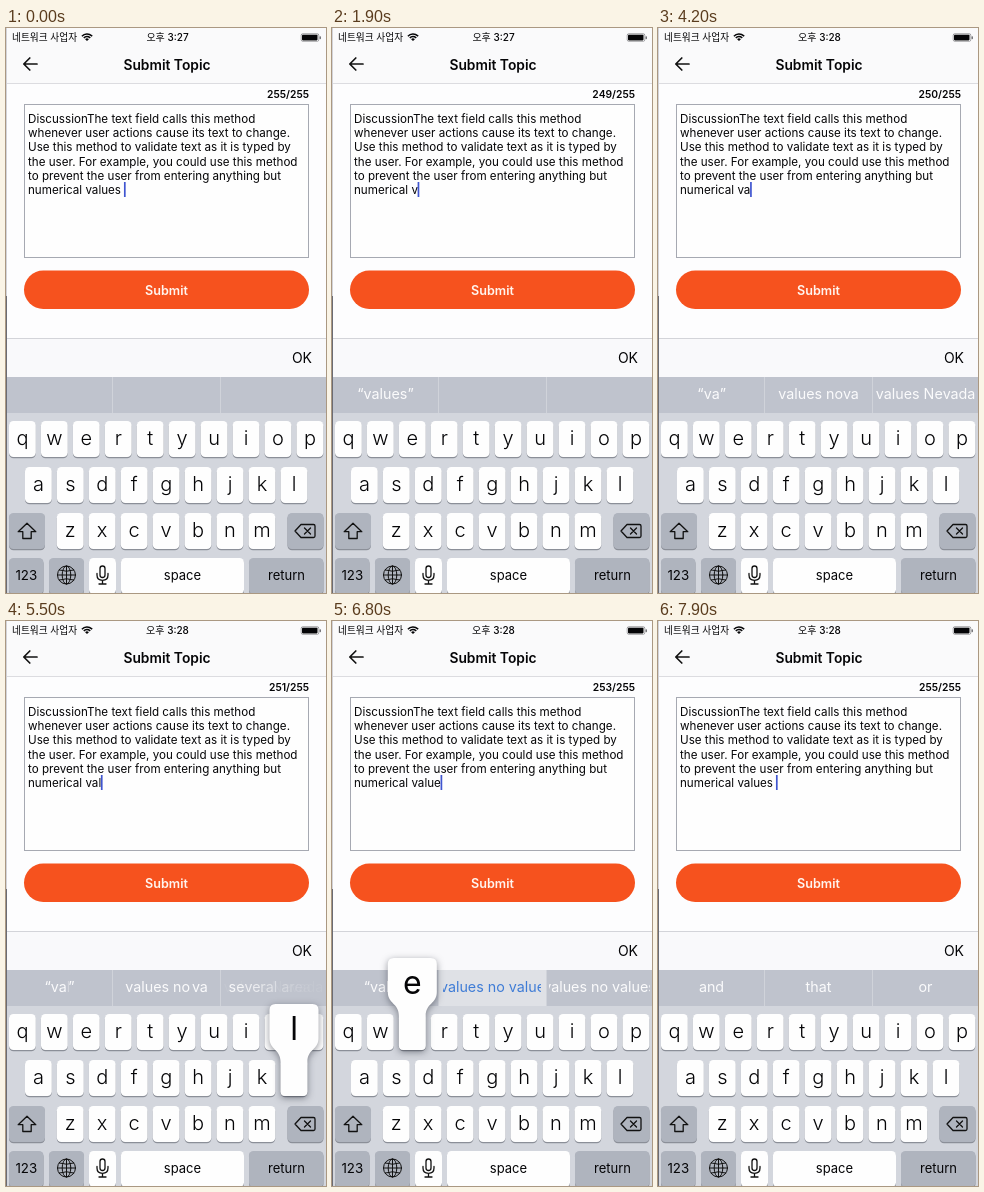
These frames come from a looping animation (320 px wide and 565 px high, 8000 ms). An HTML page with a canvas:

```html
<!DOCTYPE html>
<html lang="ko">
<head>
<meta charset="utf-8">
<title>Submit Topic</title>
<style>
html, body { margin: 0; width: 100%; height: 100%; overflow: hidden; background: #fdfdfe; }
canvas { display: block; width: 320px; height: 565px; }
</style>
</head>
<body>
<canvas id="stage"></canvas>
<script>
const W = 320, H = 565, LOOP = 8000, FADE = 240;
const FONT = 'Inter, "Noto Sans CJK KR", "Noto Sans CJK", "Open Sans", sans-serif';
const canvas = document.getElementById('stage');
const ratio = window.devicePixelRatio || 1;
canvas.width = W * ratio;
canvas.height = H * ratio;
const c = canvas.getContext('2d');
c.scale(ratio, ratio);

const LINES = [
  'DiscussionThe text field calls this method',
  'whenever user actions cause its text to change.',
  'Use this method to validate text as it is typed by',
  'the user. For example, you could use this method',
  'to prevent the user from entering anything but'
];
const LAST = 'numerical values ';
const MAX = 255;

// at: time of the edit, n: characters in the field, key: pressed key, hints: suggestions
const blank = ['', '', ''];
const back = ['“values”', '', ''];
const steps = [
  { at: 0, n: 255, hints: blank },
  { at: 1000, n: 254, key: 'del', hints: back },
  { at: 1200, n: 253, key: 'del', hints: back },
  { at: 1350, n: 252, key: 'del', hints: back },
  { at: 1500, n: 251, key: 'del', hints: back },
  { at: 1650, n: 250, key: 'del', hints: back },
  { at: 1800, n: 249, key: 'del', hints: back },
  { at: 2050, n: 248, key: 'del', hints: blank },
  { at: 2910, n: 249, key: 'v', hints: ['“v”', 'values never', 'values and'] },
  { at: 3850, n: 250, key: 'a', hints: ['“va”', 'values nova', 'values Nevada'] },
  { at: 5390, n: 251, key: 'l', hints: ['“val”', 'values no va', 'several areas'] },
  { at: 6150, n: 252, key: 'u', hints: ['“valu”', 'values no value', 'values no values'] },
  { at: 6700, n: 253, key: 'e', hints: ['“value”', 'values no value', 'values no values'], pick: true },
  { at: 7200, n: 254, key: 's', hints: ['“values”', 'values no', 'values are'] },
  { at: 7580, n: 255, key: 'space', hints: ['and', 'that', 'or'] }
];

const clamp = v => Math.max(0, Math.min(1, v));

function setFont(size, weight = 400) {
  c.font = `${weight} ${size}px ${FONT}`;
}

function text(str, x, y, size, { weight = 400, color = '#050507', align = 'left' } = {}) {
  setFont(size, weight);
  c.fillStyle = color;
  c.textAlign = align;
  c.textBaseline = 'alphabetic';
  c.fillText(str, x, y);
}

function rect(x, y, w, h, color) {
  c.fillStyle = color;
  c.fillRect(x, y, w, h);
}

function round(x, y, w, h, r, color) {
  c.beginPath();
  c.roundRect(x, y, w, h, r);
  c.fillStyle = color;
  c.fill();
}

function stroke(d, width, color = '#111') {
  c.lineWidth = width;
  c.strokeStyle = color;
  c.lineCap = c.lineJoin = 'round';
  c.stroke(new Path2D(d));
}

function statusBar(t) {
  text('네트워크 사업자', 6, 13, 9.7);
  text(t < 3300 ? '오후 3:27' : '오후 3:28', 161.5, 13, 10, { weight: 500, align: 'center' });
  c.lineCap = 'butt';
  c.strokeStyle = '#050507';
  c.lineWidth = 1.5;
  for (const r of [4.4, 7]) {
    c.beginPath();
    c.arc(81, 13, r, -Math.PI * 0.76, -Math.PI * 0.24);
    c.stroke();
  }
  c.beginPath();
  c.moveTo(81, 13);
  c.arc(81, 13, 2.6, -Math.PI * 0.76, -Math.PI * 0.24);
  c.fillStyle = '#050507';
  c.fill();
  round(294.8, 5.6, 18.4, 8, 1.8, '#77777b');
  round(295.4, 6.2, 17.2, 6.8, 1.3, '#fafafb');
  round(296, 6.8, 15.5, 5.6, 0.8, '#050507');
  round(313.6, 8.2, 1.2, 3, 0.6, '#55555a');
}

function header(t) {
  rect(0, 0, W, 55, '#fafafb');
  rect(0, 55, W, 1, '#dcdce0');
  statusBar(t);
  stroke('M31 36H18M23.8 30L17.8 36L23.8 42', 1.7);
  text('Submit Topic', 161, 42, 13.8, { weight: 600, align: 'center' });
}

function form(step, t) {
  text(`${step.n}/${MAX}`, 303, 69.5, 10.3, { weight: 600, align: 'right' });
  rect(18, 76, 285, 154, '#a6a9b2');
  rect(19, 77, 283, 152, '#fefefe');
  LINES.forEach((line, i) => text(line, 22, 94.8 + i * 14.25, 11.63));
  const typed = LAST.slice(0, LAST.length - MAX + step.n);
  text(typed, 22, 94.8 + 5 * 14.25, 11.63);
  const idle = t - step.at;
  if (idle < 600 || idle % 1000 < 550) {
    rect(22 + c.measureText(typed).width - 0.3, 154, 1.7, 15, '#3f55d0');
  }
  round(18, 242.5, 285, 38.5, 19.25, '#f6521e');
  text('Submit', 160.5, 266.5, 12.6, { weight: 600, color: '#fff5ef', align: 'center' });
  rect(0, 310, W, 39, '#f9f9fb');
  rect(0, 310, W, 1, '#d3d4d9');
  text('OK', 306, 335, 14, { align: 'right' });
}

// Shared beginning and end slide to their new places; the middle cross-fades letter by letter.
function hint(from, to, mid, p, color) {
  setFont(14.3);
  c.textAlign = 'left';
  c.fillStyle = color;
  const width = str => c.measureText(str).width;
  const x0 = mid - width(from) / 2;
  const x1 = mid - width(to) / 2;
  const short = Math.min(from.length, to.length);
  let head = 0, tail = 0;
  while (head < short && from[head] === to[head]) head++;
  while (tail < short - head && from.at(-1 - tail) === to.at(-1 - tail)) tail++;
  const ease = p * p * (3 - 2 * p);
  const slide = (a, b) => a + (b - a) * ease;
  const x = head ? slide(x0, x1) : x1;
  const fromEnd = from.length - tail, toEnd = to.length - tail;
  const put = (str, i, left, alpha) => {
    if (alpha <= 0) return;
    c.globalAlpha = alpha;
    c.fillText(str[i], left + width(str.slice(0, i)), 371);
  };
  c.fillText(to.slice(0, head), x, 371);
  for (let i = head; i < fromEnd; i++) put(from, i, head ? x : x0, clamp(1 - 2 * p));
  for (let i = head; i < toEnd; i++) put(to, i, x, clamp(2 * p - i / to.length));
  c.globalAlpha = 1;
  const tailX = slide(x0 + width(from.slice(0, fromEnd)), x1 + width(to.slice(0, toEnd)));
  c.fillText(to.slice(toEnd), tailX, 371);
}

function suggestions(step, prev, t) {
  const p = clamp((t - step.at) / FADE);
  rect(0, 349, W, 36, '#bfc3cd');
  if (step.pick) rect(107, 349, 107, 36, '#dfe1e6');
  rect(106, 349, 1, 36, '#d0d3da');
  rect(214, 349, 1, 36, '#d0d3da');
  const cells = [[4, 99, 53.5], [111, 98, 160.5], [217, 101, 267.5]];
  cells.forEach(([x, w, mid], i) => {
    c.save();
    c.beginPath();
    c.rect(x, 349, w, 36);
    c.clip();
    hint(prev.hints[i], step.hints[i], mid, p, step.pick && i === 1 ? '#3f7cd6' : '#fbfbfc');
    c.restore();
  });
}

function keyCap(x, y, w, color = '#fefefe') {
  round(x, y + 1, w, 36.3, 4.5, '#8b8f98');
  round(x, y, w, 36, 4.5, color);
}

const keyPos = {};
['qwertyuiop', 'asdfghjkl', 'zxcvbnm'].forEach((row, r) => {
  [...row].forEach((ch, i) => {
    keyPos[ch] = { x: [16.4, 32.4, 64.2][r] + i * 31.95, y: 393 + r * 46 };
  });
});

function globe(x, y) {
  c.strokeStyle = '#111';
  c.lineWidth = 1;
  for (const rx of [9, 4.3]) {
    c.beginPath();
    c.ellipse(x, y, rx, 9, 0, 0, Math.PI * 2);
    c.stroke();
  }
  stroke(`M${x} ${y - 9}v18M${x - 9} ${y}h18M${x - 7.3} ${y - 5}q7.3 2.6 14.6 0M${x - 7.3} ${y + 5}q7.3 -2.6 14.6 0`, 1);
}

function keyboard(pressed) {
  const dark = '#afb4be';
  rect(0, 385, W, 180, '#d3d6dd');
  for (const [ch, { x, y }] of Object.entries(keyPos)) {
    keyCap(x - 13.4, y, 26.8);
    text(ch, x, y + 24, 20, { weight: 350, align: 'center' });
  }
  keyCap(3, 485, 36, dark);
  stroke('M21 495.2L12.2 503.7H16.8V510.5H25.2V503.7H29.8Z', 1.3);
  keyCap(281.5, 485, 36, pressed === 'del' ? '#fefefe' : dark);
  stroke('M289 503L295 496.5H307.5Q309 496.5 309 498V508Q309 509.5 307.5 509.5H295ZM298.5 500L304.5 506M304.5 500L298.5 506', 1.3);

  keyCap(3, 530, 34.5, dark);
  text('123', 20.3, 552, 13.3, { align: 'center' });
  keyCap(43, 530, 35, dark);
  globe(60.5, 547);
  keyCap(83, 530, 27);
  round(94, 538, 5, 11.5, 2.5, '#fefefe');
  c.lineWidth = 1.3;
  c.strokeStyle = '#111';
  c.stroke();
  stroke('M91 545.5V547Q91 552.3 96.5 552.3Q102 552.3 102 547V545.5M96.5 552.3V556M93 556H100', 1.3);
  keyCap(115, 530, 123, pressed === 'space' ? dark : '#fefefe');
  text('space', 176.5, 551.5, 13, { align: 'center' });
  keyCap(243, 530, 74.5, dark);
  text('return', 280.5, 551.5, 13, { align: 'center' });
}

function popup(ch) {
  const { x, y } = keyPos[ch];
  c.save();
  c.translate(x, y - 56);
  const shape = new Path2D(
    'M-18.5 0H18.5Q24.5 0 24.5 6V34C24.5 46 13.4 45 13.4 58V87.5Q13.4 92 9 92' +
    'H-9Q-13.4 92 -13.4 87.5V58C-13.4 45 -24.5 46 -24.5 34V6Q-24.5 0 -18.5 0Z');
  c.shadowColor = 'rgba(40,44,55,.5)';
  c.shadowBlur = 7 * ratio;
  c.shadowOffsetY = 2 * ratio;
  c.fillStyle = '#fefefe';
  c.fill(shape);
  c.restore();
  text(ch, x, y - 20, 32, { weight: 400, align: 'center' });
}

function draw(t) {
  let i = steps.length - 1;
  while (steps[i].at > t) i--;
  const step = steps[i];
  const prev = steps[Math.max(0, i - 1)];
  const hold = step.key === 'del' ? 80 : 150;
  const pressed = t - step.at < hold ? step.key : null;
  rect(0, 0, W, H, '#fdfdfe');
  header(t);
  form(step, t);
  suggestions(step, prev, t);
  keyboard(pressed);
  if (keyPos[pressed]) popup(pressed);
  rect(0, 0, 1, 268, '#d2d3d9');
  rect(0, 268, 1, 297, '#6b6c74');
}

function tick(now) {
  draw(now % LOOP);
  requestAnimationFrame(tick);
}
requestAnimationFrame(tick);
</script>
</body>
</html>
```
